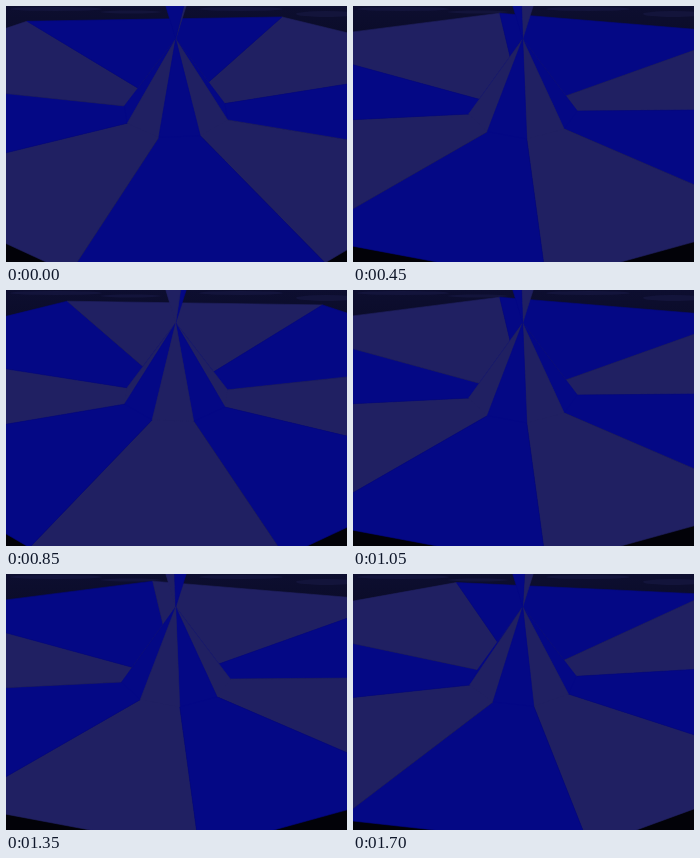
Write an HTML page that moves like this. It is 341 by 256 pixels and loops after 1.75 s.

```html
<!DOCTYPE html>
<html lang="en">
<head>
<meta charset="utf-8">
<title>Spinning cone</title>
<style>
  html, body { margin: 0; width: 100%; height: 100%; overflow: hidden; background: #020208; }
  svg { display: block; width: 100%; height: 100%; }
</style>
</head>
<body>
<svg viewBox="0 0 341 256" preserveAspectRatio="none">
  <defs>
    <linearGradient id="sky" x2="0" y2="1">
      <stop offset="0" stop-color="#0d0e30"/>
      <stop offset=".1" stop-color="#0b0c2a"/>
      <stop offset=".5" stop-color="#020208"/>
    </linearGradient>
  </defs>
  <rect width="341" height="256" fill="url(#sky)"/>
  <g fill="#1a1b48" opacity=".5">
    <ellipse cx="50" cy="3" rx="46" ry="2"/>
    <ellipse cx="125" cy="6" rx="30" ry="1.5"/>
    <ellipse cx="235" cy="3" rx="42" ry="2"/>
    <ellipse cx="320" cy="8" rx="30" ry="3"/>
  </g>
  <g id="scene" stroke-width=".6" stroke-linejoin="round"></g>
</svg>
<script>
const LOOP = 1750, STEP = 50, SECTORS = 8, SPAN = 360 / SECTORS;
const START = 18.5, SPEED = SPAN / 300;
const BLUE = '#040885', GREY = '#202062';
const CENTER = 170, TIP = [169.7, 33], HUB = [170.5, 105];
const RIM = { rx: 334, y: 112, tilt: 135, bend: 30 };
const FOLD = { rx: 54.5, y: 106.5, tilt: 22, bend: 4.5 };

const scene = document.getElementById('scene');
const makeFaces = () => Array.from({ length: SECTORS }, (_, i) => {
  const face = document.createElementNS('http://www.w3.org/2000/svg', 'polygon');
  const color = i % 2 ? BLUE : GREY;
  face.setAttribute('fill', color);
  face.setAttribute('stroke', color);
  scene.append(face);
  return face;
});
const dish = makeFaces(), cone = makeFaces(), funnel = makeFaces();

const cosDeg = a => Math.cos(a * Math.PI / 180);
const sinDeg = a => Math.sin(a * Math.PI / 180);

// Angle 0 is the far side, 180 the near side.
function ringPoint(ring, angle) {
  const c = cosDeg(angle);
  return [CENTER + ring.rx * sinDeg(angle), ring.y - ring.tilt * c + ring.bend * c * c];
}

function funnelX(angle) {
  const x = 8 - 0.42 * (angle - 153.5);
  return 170 + Math.max(-10.5, Math.min(10.5, x));
}

function setPoints(face, ...points) {
  face.setAttribute('points', points.map(p => p.map(v => v.toFixed(2)).join()).join(' '));
}

function draw(time) {
  const turn = START - SPEED * time;
  const depth = [];
  for (let i = 0; i < SECTORS; i++) {
    const a = (((turn + SPAN * i) % 360) + 360) % 360, b = a + SPAN;
    const inA = ringPoint(FOLD, a), inB = ringPoint(FOLD, b);
    // The dish runs on to the hub under the cone, so no seam shows at the fold.
    setPoints(dish[i], HUB, inA, ringPoint(RIM, a), ringPoint(RIM, b), inB);
    setPoints(cone[i], TIP, inA, inB);
    depth[i] = cosDeg(a + SPAN / 2);

    const left = funnelX(b), right = funnelX(a);
    funnel[i].style.display = right - left > 0.01 ? '' : 'none';
    setPoints(funnel[i], [left, -1], [right, -1], TIP);
  }
  // Far cone faces go first so that near ones cover them.
  const order = [...cone.keys()].sort((p, q) => depth[q] - depth[p]);
  for (const i of order) scene.insertBefore(cone[i], funnel[0]);
}

let shown = -1;
const origin = performance.now();
function tick() {
  const time = Math.floor((performance.now() - origin) % LOOP / STEP) * STEP;
  if (time !== shown) draw(shown = time);
  requestAnimationFrame(tick);
}
tick();
</script>
</body>
</html>
```
